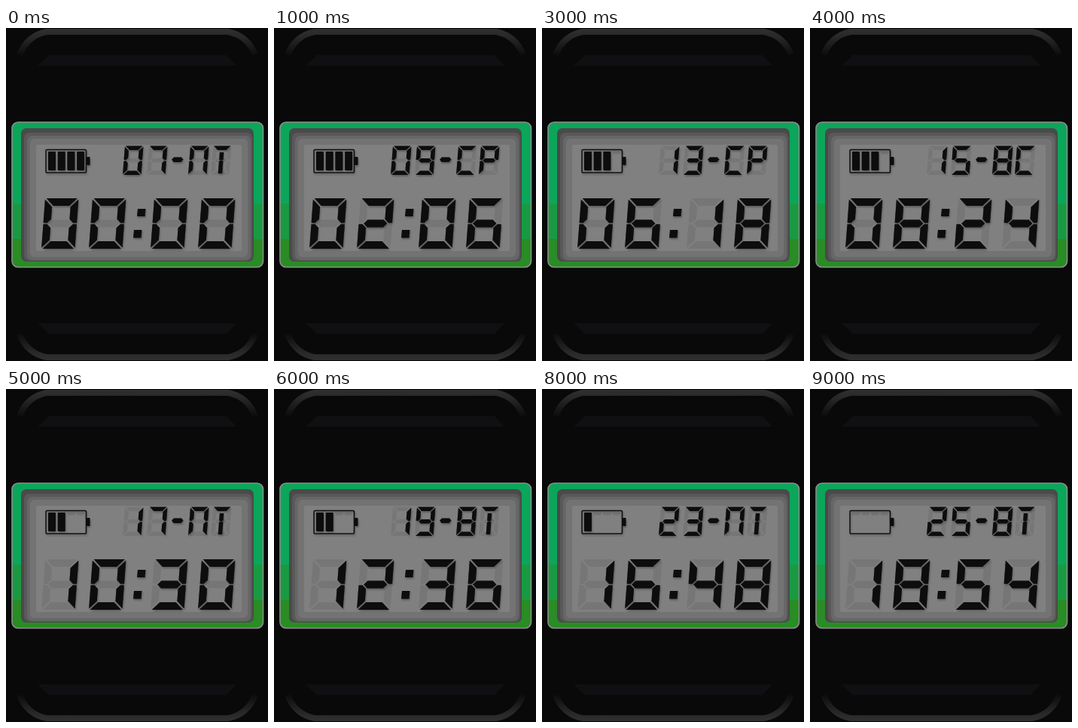
Write an HTML page that moves like this. It is 348 px wide and 442 px high and loops after 10000 ms.

```html
<!DOCTYPE html>
<html lang="en">
<head>
<meta charset="utf-8">
<title>Digital watch</title>
<style>
html, body { margin: 0; width: 100%; height: 100%; overflow: hidden; background: #09090a; }
svg { display: block; width: 348px; height: 442px; }
.on { fill: #0a0a0a; filter: url(#drop); }
.off { fill: #767676; }
</style>
</head>
<body>
<svg id="watch" viewBox="0 0 348 442" xmlns="http://www.w3.org/2000/svg">
  <defs>
    <linearGradient id="rim" gradientUnits="userSpaceOnUse" x1="0" y1="1" x2="0" y2="37">
      <stop offset="0" stop-color="#303031"/>
      <stop offset=".3" stop-color="#28282a"/>
      <stop offset="1" stop-color="#0b0b0c"/>
    </linearGradient>
    <linearGradient id="body" gradientUnits="userSpaceOnUse" x1="0" y1="125" x2="0" y2="318">
      <stop offset=".56" stop-color="#0ba65a"/>
      <stop offset=".56" stop-color="#199a42"/>
      <stop offset=".803" stop-color="#199a42"/>
      <stop offset=".803" stop-color="#298c25"/>
    </linearGradient>
    <filter id="drop" x="-30%" y="-30%" width="160%" height="160%">
      <feDropShadow dx="1" dy="2" stdDeviation="1.3" flood-color="#000" flood-opacity=".28"/>
    </filter>
    <g id="strap">
      <path d="M18 36Q28 10 54 5H295Q321 10 331 36" fill="none" stroke="url(#rim)" stroke-width="8"/>
      <path d="M42 50L57 36H293L306 50Z" fill="#101012"/>
    </g>
  </defs>
  <rect width="348" height="442" fill="#09090a"/>
  <use href="#strap"/>
  <use href="#strap" transform="matrix(1 0 0 -1 0 442)"/>
  <rect x="8" y="125" width="333.5" height="192.500" rx="8" fill="url(#body)" stroke="#8c8c8c" stroke-width="1.600"/>
  <g id="screen"></g>
  <g id="ghost" class="off"></g>
  <g id="ink" class="on"></g>
</svg>
<script>
const $ = id => document.getElementById(id);

// Screen inset: left, top, right, bottom, radius, colour
$('screen').innerHTML = [
  [20, 133, 329, 310, 7, '#4a4a4a'],
  [24, 139, 327, 309, 7, '#595959'],
  [28, 143, 325, 308, 7, '#676767'],
  [32, 147, 321, 304, 6, '#737373'],
  [40, 155, 313, 296, 2, '#808080']
].map(([l, t, r, b, rx, fill]) =>
  `<rect x="${l}" y="${t}" width="${r - l}" height="${b - t}" rx="${rx}" fill="${fill}"/>`).join('');

const poly = points => `<path d="M${points.map(p => p.map(n => +n.toFixed(2))).join('L')}Z"/>`;

// Seven bevelled bars plus a centre stem, leaning right
function segments(x, y, w, h, t, lean, gap) {
  const m = h / 2, s = t / 2;
  const shapes = {
    a: [[gap, 0], [w - gap, 0], [w - t - gap, t], [t + gap, t]],
    b: [[w, gap], [w, m - 1], [w - s, m - gap / 2], [w - t, m - s - gap / 2], [w - t, t + gap]],
    c: [[w, m + 1], [w, h - gap], [w - t, h - t - gap], [w - t, m + s + gap / 2], [w - s, m + gap / 2]],
    d: [[t + gap, h - t], [w - t - gap, h - t], [w - gap, h], [gap, h]],
    e: [[0, m + 1], [s, m + gap / 2], [t, m + s + gap / 2], [t, h - t - gap], [0, h - gap]],
    f: [[0, gap], [t, t + gap], [t, m - s - gap / 2], [s, m - gap / 2], [0, m - 1]],
    g: [[s + gap, m], [t + gap, m - s], [w - t - gap, m - s], [w - s - gap, m], [w - t - gap, m + s], [t + gap, m + s]],
    i: [[w / 2 - s, t + 3], [w / 2 + s, t + 3], [w / 2 + s, m - 1], [w / 2, m], [w / 2 - s, m - 1]],
    j: [[w / 2 - s, m + 1], [w / 2, m], [w / 2 + s, m + 1], [w / 2 + s, h - 2], [w / 2 - s, h - 2]]
  };
  for (const k in shapes)
    shapes[k] = poly(shapes[k].map(([px, py]) => [x + px + lean * (1 - py / h), y + py]));
  return shapes;
}

const glyphs = {
  0: 'abcdef', 1: 'bc', 2: 'abged', 3: 'abgcd', 4: 'fgbc', 5: 'afgcd',
  6: 'afgedc', 7: 'abc', 8: 'abcdefg', 9: 'abcdfg',
  П: 'abcef', Н: 'bcefg', В: 'abcdefg', Т: 'aij', С: 'adef', Р: 'abefg', Ч: 'bcfg', Б: 'acdefg'
};
const days = ['ВС', 'ПН', 'ВТ', 'СР', 'ЧТ', 'ПТ', 'СБ'];

const big = [47, 110, 192, 255].map(x => segments(x, 226, 44.500, 67, 10, 5, 1.600));
const small = [155, 187, 242, 272].map(x => segments(x, 156.500, 24.500, 38.500, 5.500, 3, 1));
const cells = [...big, ...small];

const box = (x, y, w, h, rx = 0) => `<rect x="${x}" y="${y}" width="${w}" height="${h}" rx="${rx}"/>`;
const barX = k => 56 + k * 12.700;
const fixed =
  poly([[175, 240], [185.500, 240], [184.500, 250], [174, 250]]) +
  poly([[170, 268], [180.500, 268], [179.500, 278.500], [169, 278.500]]) +
  poly([[220, 174.500], [223, 171.500], [233, 171.500], [235.500, 174.500], [232.500, 178], [222.500, 178]]) +
  '<rect x="53" y="161.500" width="53.500" height="30.500" rx="1.500" fill="none" stroke="#0a0a0a" stroke-width="1.500"/>' +
  box(107, 171, 4.500, 11, 1);

$('ghost').innerHTML =
  cells.map(c => [...'abcdefg'].map(k => c[k]).join('')).join('') +
  [0, 1, 2, 3].map(k => box(barX(k), 164, 10, 4)).join('');

const pad = n => String(n).padStart(2, '0');
let shown = -1;

function draw(step) {
  const date = new Date(2022, step, 7 + 2 * step);
  const text = pad(2 * step) + pad(6 * step) + pad(date.getDate()) + days[date.getDay()];
  const bars = Math.min(4, 4 - Math.floor((step - 1) / 2));
  let out = fixed;
  [...text].forEach((ch, n) => { for (const k of glyphs[ch]) out += cells[n][k]; });
  for (let k = 0; k < bars; k++) out += box(barX(k), 164, 10, 25, 1);
  $('ink').innerHTML = out;
}

const start = performance.now();
function tick() {
  const step = Math.floor((performance.now() - start) / 1000) % 10;
  if (step !== shown) draw(shown = step);
  requestAnimationFrame(tick);
}
tick();
</script>
</body>
</html>
```
